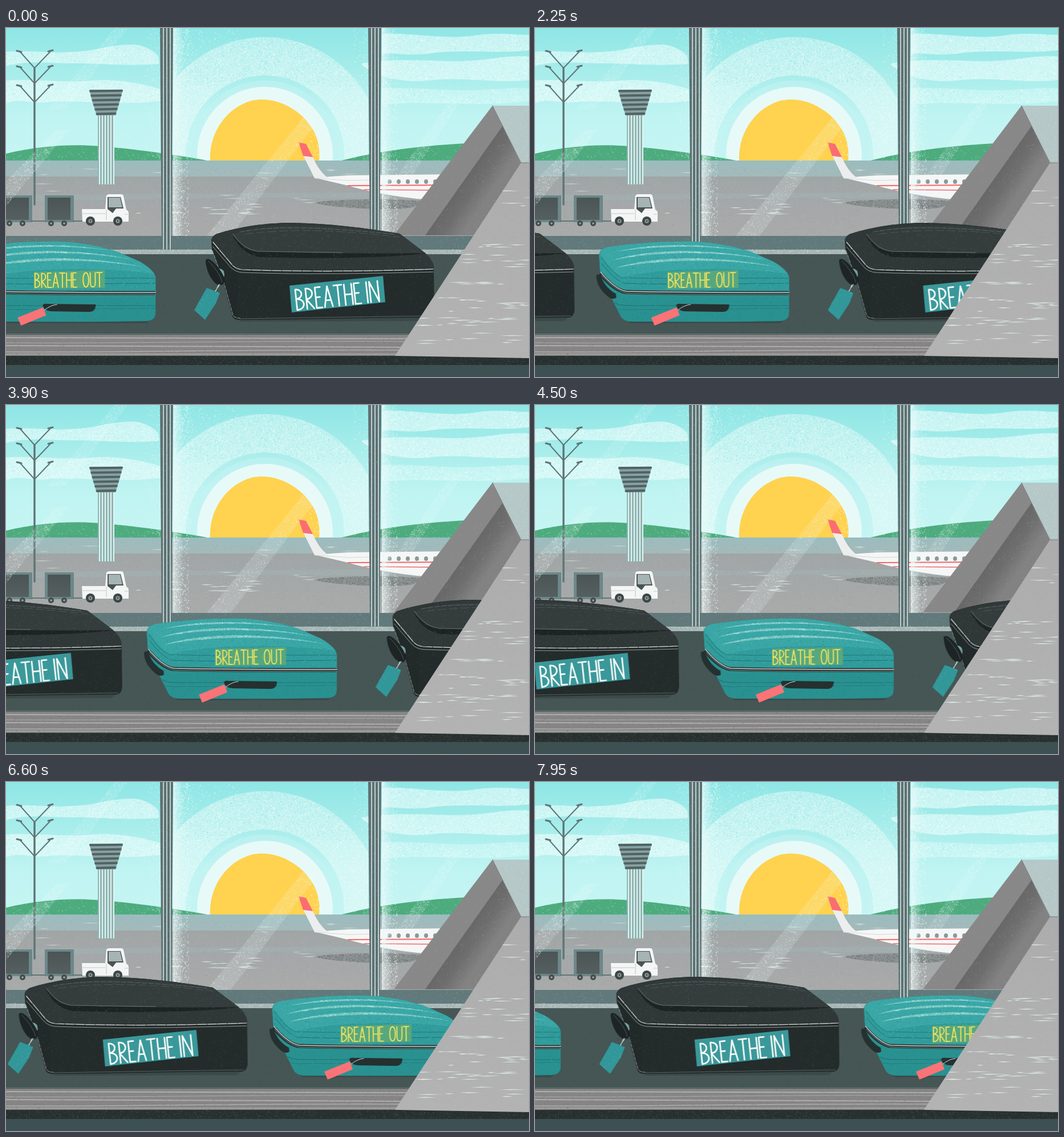
These frames come from a looping animation (917 by 611 pixels, 8000 ms). An HTML page with a canvas:

```html
<!DOCTYPE html>
<html lang="en">
<head>
<meta charset="utf-8">
<title>Baggage belt</title>
<style>
html, body { margin: 0; width: 100%; height: 100%; overflow: hidden; background: #455655; }
#stage { position: relative; width: 917px; height: 611px; overflow: hidden; }
canvas { position: absolute; top: 0; left: 0; }
#belt { left: -900px; will-change: transform; }
</style>
</head>
<body>
<div id="stage">
  <canvas id="scene" width="917" height="611"></canvas>
  <canvas id="belt" width="1817" height="611" role="img" aria-label="BREATHE IN, BREATHE OUT"></canvas>
  <canvas id="ramp" width="917" height="611"></canvas>
</div>
<script>
const STEP_MS = 150, STEPS = 53, LOOP = 8000, STEP_PX = 12.22, GAP = 865;

let seed = 7;
function rnd() {
  seed = (seed + 0x6D2B79F5) | 0;
  let t = Math.imul(seed ^ (seed >>> 15), 1 | seed);
  t = (t + Math.imul(t ^ (t >>> 7), 61 | t)) ^ t;
  return ((t ^ (t >>> 14)) >>> 0) / 4294967296;
}

const layer = id => document.getElementById(id).getContext('2d');
const disc = (x, y, r) => `M${x - r} ${y}a${r} ${r} 0 1 1 ${2 * r} 0a${r} ${r} 0 1 1 ${-2 * r} 0z`;
const box = (x, y, w, h) => `M${x} ${y}h${w}v${h}h${-w}z`;

function fill(c, color, d) {
  c.fillStyle = color;
  c.fill(new Path2D(d), 'evenodd');
}
function line(c, color, width, d, dash = []) {
  c.strokeStyle = color;
  c.lineWidth = width;
  c.lineCap = c.lineJoin = 'round';
  c.setLineDash(dash);
  c.stroke(new Path2D(d));
  c.setLineDash([]);
}
function fade(c, x0, y0, x1, y1, ...colors) {
  const g = c.createLinearGradient(x0, y0, x1, y1);
  colors.forEach((k, i) => g.addColorStop(i / (colors.length - 1), k));
  return g;
}
// Chalky specks inside a path; px and py push them towards the left or top.
function grain(c, color, n, d, [x, y, w, h], px = 1, py = 1) {
  c.save();
  c.clip(new Path2D(d), 'evenodd');
  c.fillStyle = color;
  for (let i = 0; i < n; i++) {
    const s = 0.7 + rnd() * 0.9;
    c.fillRect(x + w * rnd() ** px, y + h * rnd() ** py, s, s);
  }
  c.restore();
}
function spray(c, color, n, x, y, w, h, px, py) {
  grain(c, color, n, box(Math.min(x, x + w), y, Math.abs(w), h), [x, y, w, h], px, py);
}
// Thin tapered brush marks.
function scratches(c, color, n, [x, y, w, h], len, d) {
  c.save();
  if (d) c.clip(new Path2D(d));
  for (let i = 0; i < n; i++) {
    const l = len * (0.3 + rnd()), a = x + rnd() * w, b = y + rnd() * h;
    fill(c, color, `M${a} ${b}l${l * .5} ${-.7}l${l * .5} ${.8}l${-l * .6} ${.8}z`);
  }
  c.restore();
}

const GLYPHS = {
  B: [1.1, 'M0 0V1M0 0C1 0 1 .45 0 .47C1.25 .47 1.25 1 0 1'],
  R: [1, 'M0 1V0C1.2 0 1.2 .5 0 .53L1 1'],
  E: [.82, 'M.9 0H0V1H1M0 .48H.75'],
  A: [1.15, 'M0 1L.5 0L1 1M.18 .68H.82'],
  T: [1.15, 'M0 0H1M.5 0V1'],
  H: [1.05, 'M0 0V1M1 0V1M0 .5H1'],
  I: [.15, 'M.5 0V1'],
  N: [1.2, 'M0 1V0L1 1V0'],
  O: [1.25, 'M.5 0C1.15 0 1.15 1 .5 1C-.15 1-.15 0 .5 0'],
  U: [1.1, 'M0 0V.7C0 1.1 1 1.1 1 .7V0']
};
function letter(c, text, x, y, [w, h, gap, space], tilt, color, weight) {
  c.save();
  c.translate(x, y);
  c.rotate(tilt);
  c.strokeStyle = color;
  c.lineWidth = weight;
  c.lineCap = c.lineJoin = 'round';
  let at = 0;
  for (const ch of text) {
    if (ch === ' ') { at += space; continue; }
    const [k, d] = GLYPHS[ch], p = new Path2D();
    p.addPath(new Path2D(d), new DOMMatrix([w * k, 0, 0, h, at, 0]));
    c.stroke(p);
    at += w * k + gap;
  }
  c.restore();
}

function sky(c) {
  fill(c, fade(c, 0, 0, 0, 232, '#8ee6e5', '#a7edeb', '#bff4f2', '#c6f5f3'), box(0, 0, 917, 232));

  const cx = 454, cy = 222;
  c.save();
  c.beginPath();
  c.rect(294, 0, 341, 232);
  c.clip();
  const ring = disc(cx, cy, 206) + disc(cx, cy, 139);
  fill(c, 'rgba(232,251,250,.5)', ring);
  grain(c, 'rgba(242,254,253,.75)', 7000, ring, [250, 10, 410, 225]);
  grain(c, 'rgba(150,232,230,.75)', 2300, ring, [310, 12, 320, 90], 1, 1.4);
  spray(c, 'rgba(235,253,252,.65)', 900, 294, 0, 120, 232, 1.4, 1);
  fill(c, 'rgba(196,244,243,.6)', disc(cx, cy, 130));
  fill(c, '#e7faf8', disc(cx, cy, 119));
  const sun = 'M358 233C355 184 387 139 431 127C479 117 530 150 545 193C550 208 550 222 549 233z';
  fill(c, '#ffd24f', sun);
  grain(c, '#fff0b8', 200, sun, [553, 130, -24, 103], 1.7);
  c.restore();

  const clouds = [
    'M0 42C40 38 80 46 130 41C160 39 175 31 215 29C245 28 262 42 268 52V63C200 68 160 60 110 62C70 62 40 56 0 67z',
    'M0 92C50 88 100 97 150 92C200 88 245 99 270 107V128C190 137 120 124 70 130C40 132 20 122 0 132z',
    'M659 10C720 8 770 22 830 12C870 7 900 13 917 12V39C860 46 800 36 740 45C700 49 670 42 659 45z',
    'M624 62C690 50 760 61 820 57C860 53 890 47 917 50V91C860 98 800 84 740 92C700 96 650 88 624 64z',
    'M659 106C720 102 780 113 840 108C870 106 900 104 917 106V128C830 140 740 126 659 134z'
  ];
  clouds.forEach((d, i) => {
    const area = [i < 2 ? 0 : 620, 5, i < 2 ? 272 : 300, 135];
    fill(c, i === 4 ? 'rgba(235,253,252,.33)' : 'rgba(235,253,252,.6)', d);
    grain(c, 'rgba(246,255,254,.8)', 2600, d, area);
    grain(c, 'rgba(150,232,230,.6)', 900, d, area);
  });

  const hills = 'M0 220C60 206 115 203 165 207C240 213 310 224 358 233H0zM584 233C650 216 725 205 830 201V233z';
  fill(c, '#4dab7e', hills);
  grain(c, 'rgba(150,215,180,.6)', 700, hills, [0, 200, 830, 33], 1, .7);
}

function ground(c) {
  fill(c, fade(c, 0, 232, 0, 262, '#9bbcbe', '#a5b9ba'), box(0, 232, 917, 30));
  fill(c, fade(c, 0, 260, 0, 364, '#a0a5a5', '#a5a8a8', '#a9aaaa'), box(0, 260, 917, 104));
  fill(c, 'rgba(160,184,185,.35)', 'M0 292L917 286V300L400 297L0 304z');
  spray(c, 'rgba(182,194,194,.5)', 2000, 0, 232, 917, 132, 1, 1);
  spray(c, 'rgba(142,150,150,.4)', 1200, 0, 240, 917, 124, 1, 1);
  scratches(c, 'rgba(215,232,231,.6)', 16, [0, 240, 620, 70], 36);
  scratches(c, 'rgba(225,240,238,.75)', 16, [215, 308, 220, 18], 30);

  const shade = 'M538 306C580 298 690 299 735 303L712 314C680 320 580 316 538 306z';
  fill(c, 'rgba(112,120,120,.4)', shade);
  grain(c, '#707878', 1100, shade, [538, 298, 198, 22]);
}

function airfield(c) {
  const pole = '#5f7475';
  line(c, pole, 3.4, 'M50 70V309');
  for (const y of [40, 67, 100]) {
    line(c, pole, 1.9, `M25 ${y + 2}L50 ${y + 30}L77 ${y + 2}`);
    line(c, pole, 3, `M19 ${y}l8 2M82 ${y - 1}l-8 2`);
  }

  fill(c, '#8fb5b3', box(161, 150, 29, 124));
  for (let x = 164; x < 190; x += 5) line(c, '#e2f4f2', 2, `M${x} 153V273`);
  fill(c, '#86a2a2', 'M146 108H205L199 130L192 153H159L151 128z');
  for (let i = 0; i < 6; i++) {
    const y = 110.5 + i * 8, k = i * 2.3;
    line(c, '#526263', 4, `M${148 + k} ${y}L${203 - k} ${y - .8}`);
  }

  for (const x of [-5, 68]) {
    fill(c, '#6d8789', box(x, 293, 51, 47));
    fill(c, fade(c, 0, 297, 0, 338, '#4b5555', '#566061'), box(x + 5, 297, 40, 39));
    for (const w of [x + 11, x + 34]) {
      fill(c, '#434d4d', disc(w, 342, 5));
      fill(c, '#9aa8a8', disc(w, 342, 1.8));
    }
  }
  line(c, '#607475', 2, 'M45 338H68M118 338H134');

  fill(c, '#f4f6f5', 'M133 317H174L176 294Q177 291 181 291H202Q205 291 206 294L211 318Q215 320 215 324V339H134z');
  fill(c, '#4a5354', 'M178 296H201L206 316H193L187 324L178 317z');
  fill(c, '#a7b4b4', 'M180 297H200L204 314H180z');
  line(c, '#c5cdcc', 1.2, 'M134 325H174M176 318V336M208 326h6');
  for (const x of [148, 196]) {
    fill(c, '#3d4545', disc(x, 338, 8));
    fill(c, '#8d9999', disc(x, 338, 3.6));
    fill(c, '#3d4545', disc(x, 338, 1.4));
  }

  const hull = 'M540 262L600 258L790 256V300H735C700 298 640 288 600 276z';
  fill(c, '#f5f7f6', hull);
  fill(c, '#eceeed', 'M521 223L538 226C544 240 552 253 565 263L541 263z');
  fill(c, '#fb6d72', 'M513 200L526 203L538 226L521 224z');
  line(c, '#d2dad9', 1, 'M542 263L600 267L640 266');
  line(c, '#f4666a', 2, 'M600 276L770 275');
  line(c, '#f4666a', 1.3, 'M628 283L760 284');
  for (let i = 0; i < 6; i++) {
    fill(c, '#879b9a', `M${669 + i * 16} 269a3.5 4 0 1 1 7 0a3.5 4 0 1 1 -7 0z`);
  }
}

function glass(c) {
  const beams = [
    ['M520 158L546 164L394 364H352z', [348, 155, 202, 210], .15],
    ['M190 0H214L106 142L72 142z', [70, 0, 146, 142], .07],
    ['M88 178L112 178L0 312V268z', [0, 176, 116, 138], .1],
    ['M784 118L804 118L712 258H686z', [684, 116, 124, 142], .08]
  ];
  for (const [d, area, a] of beams) {
    fill(c, `rgba(240,252,251,${a})`, d);
    grain(c, 'rgba(240,252,251,.45)', 1700, d, area);
  }
  for (const x of [293, 659]) {
    fill(c, fade(c, x, 0, x + 18, 0, 'rgba(235,250,249,.6)', 'rgba(235,250,249,0)'), box(x, 0, 18, 364));
    spray(c, 'rgba(238,252,251,.7)', 1500, x, 0, 28, 364, 2, 1);
    spray(c, 'rgba(238,252,251,.5)', 450, x - 23, 0, -28, 232, 2, 1);
  }
}

function hall(c) {
  fill(c, '#61797a', box(0, 364, 917, 24));
  spray(c, 'rgba(135,160,160,.4)', 900, 0, 364, 917, 24, 1, 1);
  for (const x of [270, 635]) {
    fill(c, '#5c7071', `M${x} 0H${x + 23}L${x + 20} 387H${x + 3}z`);
    for (const k of [6, 12, 18]) line(c, '#d5e8e6', 1.6, `M${x + k} 0V387`);
    spray(c, 'rgba(145,170,170,.4)', 250, x, 0, 22, 387, 1, 1);
  }
  fill(c, '#a7b6b5', box(0, 388, 917, 8));
  spray(c, 'rgba(215,228,227,.6)', 700, 0, 387, 917, 9, 1, 1);

  const back = 'M853 136L905 238L824 363H680z';
  fill(c, '#898888', back);
  fill(c, fade(c, 800, 262, 846, 294, '#676666', '#6f6e6e', '#838282'), 'M871 171L905 238L824 363H735z');
  grain(c, 'rgba(160,160,160,.4)', 1100, back, [680, 136, 225, 228]);

  fill(c, '#455655', box(0, 396, 917, 140));
  spray(c, 'rgba(57,73,73,.45)', 1400, 0, 396, 917, 140, 1, 1);
  line(c, '#68787a', 1.2, 'M0 535.5H720');
  fill(c, '#878585', box(0, 537, 760, 38));
  for (const [y, e, w] of [[542, 544, 1.8], [551, 549, 1], [556, 559, 1.8], [567, 564, 1.4], [571, 571, 1.4]]) {
    line(c, '#aeafaf', w, `M0 ${y}C180 ${y + 2} 420 ${e - 2} 720 ${e}`);
  }
  spray(c, 'rgba(118,119,119,.5)', 800, 0, 537, 720, 37, 1, 1);
  fill(c, '#28302f', box(0, 574, 917, 17));
  spray(c, 'rgba(70,86,85,.6)', 1300, 0, 574, 917, 17, 1, 1);
  fill(c, '#3d5052', box(0, 590, 917, 21));
  spray(c, 'rgba(60,88,90,.8)', 900, 0, 591, 917, 20, 1, 1);
}

function blackCase(c) {
  const body = 'M360 372Q360 366 368 361C410 347 460 341 500 341C565 342 630 350 690 360L735 394Q750 408 750 420L751 494Q750 505 742 507C630 507 520 511 408 511Q400 511 397 505L381 446L361 388z';
  const lid = 'M360 372Q360 366 368 361C410 347 460 341 500 341C565 342 630 350 690 360L735 394Q750 408 750 423C630 427 520 427 412 423Q402 421 396 413L363 376z';
  fill(c, 'rgba(45,60,60,.45)', 'M398 505L745 503L732 513L412 514z');
  fill(c, '#242b2b', body);
  fill(c, '#222929', 'M361 376L396 417Q404 424 406 428L404 508L397 503L381 446z');
  fill(c, '#2f3737', lid);
  fill(c, '#343c3c', 'M396 361C450 346 500 344 560 347C620 350 660 355 690 360L735 394C640 396 520 392 440 391C418 389 410 376 396 361z');
  fill(c, '#1d2323', 'M396 361C410 378 420 390 440 391C540 394 640 396 737 394C680 402 560 405 445 401C420 397 406 381 396 361z');
  line(c, '#7c8685', .8, 'M398 361C412 380 424 388 442 391C500 392 560 393 590 393');
  line(c, '#626c6b', .9, 'M410 357C470 345 560 349 680 361', [9, 3]);
  line(c, '#555f5e', .8, 'M420 361C500 350 590 354 690 366', [14, 6]);
  grain(c, 'rgba(88,100,99,.5)', 900, lid, [360, 341, 392, 85]);
  grain(c, 'rgba(65,77,76,.5)', 800, body, [360, 425, 392, 87]);
  line(c, '#dde3e1', 1.2, 'M363 375L395 413Q402 422 414 423C520 427 640 426 749 422', [16, 1.8]);
  line(c, '#9fa9a8', .9, 'M363 383L394 419Q402 427 414 428C520 432 640 430 749 427');
  line(c, '#a4aead', .9, 'M362 390L382 446L398 503Q401 508 410 508', [6, 2]);
  line(c, '#667271', .8, 'M410 509L600 506L744 504');

  fill(c, '#78a3a3', 'M374 421Q383 422 383 433Q380 443 372 440z');
  fill(c, '#1d2424', 'M350 406Q354 402 360 407C372 416 383 433 384 443Q381 452 372 450C360 444 350 423 350 406z');
  line(c, '#596463', .9, 'M355 408C365 418 376 432 379 445');
  line(c, '#cbd9d8', 1.1, 'M375 449L363 466M373 449L367 462');
  const tag = 'M352 455L375 464L368 482L349 511L330 494z';
  fill(c, '#319799', tag);
  grain(c, 'rgba(90,185,183,.5)', 90, tag, [330, 453, 46, 58]);

  const label = 'M497 451L661 434L665 480L501 498z';
  fill(c, '#3a989a', label);
  grain(c, 'rgba(95,180,178,.45)', 200, label, [496, 433, 170, 65]);
  letter(c, 'BREATHE IN', 507, 458, [12.2, 36, 4.4, 6.5], -.105, '#fbfdfb', 2.7);
}

function tealCase(c) {
  const body = 'M27 402Q25 388 40 384C90 376 150 373 195 374C240 377 270 384 296 393L332 409Q360 425 360 438V499Q360 511 346 513C260 515 170 514 82 514Q68 513 64 504L49 474L29 433z';
  const lid = 'M27 402Q25 388 40 384C90 376 150 373 195 374C240 377 270 384 296 393L332 409Q360 425 360 438V462H75Q60 461 50 449L29 429z';
  fill(c, 'rgba(45,60,60,.4)', 'M66 506L358 506L344 517L82 517z');
  fill(c, '#2a9191', body);
  fill(c, '#319c9c', lid);
  fill(c, '#3aa7a6', 'M29 395Q30 387 40 384C90 376 150 373 195 374C240 377 270 384 296 393L332 409C345 416 353 424 356 430C260 417 130 420 64 437Q38 418 29 395z');
  grain(c, 'rgba(35,132,134,.5)', 1400, body, [27, 374, 334, 140], 1, .7);
  grain(c, 'rgba(95,195,191,.45)', 900, lid, [27, 374, 334, 88], 1, 1.4);

  const ribs = [
    'M60 391C110 378 200 375 282 390C200 378 115 383 60 391z',
    'M50 407C110 386 220 385 318 405C220 388 115 392 50 407z',
    'M56 420C115 400 230 396 338 418C230 401 125 406 56 420z'
  ];
  for (const d of ribs) {
    fill(c, 'rgba(165,222,217,.5)', d);
    grain(c, 'rgba(205,240,236,.8)', 2600, d, [30, 376, 310, 46]);
  }
  line(c, '#237d7f', 1.2, 'M31 401C44 421 56 432 67 437C160 440 260 437 359 438', [60, 3]);
  line(c, '#1f7274', 1, 'M32 413Q53 440 70 447C160 450 260 447 359 447', [44, 4]);
  line(c, '#1f7274', 1.1, 'M54 481Q62 486 80 486H359', [70, 3]);
  line(c, '#237d7f', 1, 'M58 491Q66 494 85 493L359 491', [38, 4]);

  line(c, '#253030', 7, 'M31 432Q53 458 72 462C160 465 260 464 357 464');
  line(c, '#c8d5d2', 1.5, 'M30 428Q54 457 74 461C160 463 260 463 360 463');
  line(c, '#8ca09e', .8, 'M31 433Q54 460 74 464C160 467 260 466 360 466');
  fill(c, '#253030', 'M22 434Q23 429 29 433C34 447 45 460 56 465L57 472Q50 477 42 470C29 459 22 447 22 434z');

  fill(c, '#253030', 'M162 486Q163 482 170 483L255 484Q255 497 243 497L177 496Q164 495 162 486z');
  line(c, '#d2e2df', 1, 'M165 494Q176 485 187 484');
  fill(c, '#fb7377', 'M118 507L163 489L168 503L124 521z');

  const label = 'M146 427L271 424V455L146 457z';
  fill(c, '#58a77c', label);
  grain(c, 'rgba(125,190,140,.45)', 150, label, [146, 424, 125, 33]);
  letter(c, 'BREATHE OUT', 148.5, 429.5, [8, 25, 2.7, 8.5], -.012, '#f1e461', 1.9);
}

function cover(c) {
  const top = 'M853 136H917V237H903z';
  fill(c, '#b5c7c7', top);
  grain(c, 'rgba(205,218,217,.5)', 500, top, [853, 136, 64, 101]);
  const front = 'M903 236H917V578L682 574z';
  fill(c, fade(c, 0, 236, 0, 577, '#acacac', '#b3b3b3'), front);
  grain(c, 'rgba(190,192,192,.5)', 1600, front, [682, 236, 235, 342]);
  grain(c, 'rgba(160,160,160,.4)', 700, front, [682, 236, 235, 342]);
  line(c, '#757777', 1, 'M853 136L903 236H917');
  const bands = [[850, 268, 70, 50, 4], [815, 374, 85, 12, 6], [785, 394, 125, 26, 9], [775, 445, 90, 4, 6],
    [755, 472, 145, 24, 15], [715, 506, 165, 16, 15], [708, 533, 195, 20, 8]];
  for (const [x, y, w, h, n] of bands) scratches(c, 'rgba(228,243,240,.8)', n, [x, y, w, h], 38, front);
}

const scene = layer('scene');
[sky, ground, airfield, glass, hall].forEach(draw => draw(scene));

const belt = layer('belt');
for (const x of [0, -GAP]) {
  for (const [draw, dx] of [[tealCase, -97.7], [blackCase, 0]]) {
    belt.save();
    belt.translate(900 + x + dx, 0);
    draw(belt);
    belt.restore();
  }
}
cover(layer('ramp'));

const end = `translateX(${STEP_PX * STEPS}px)`;
belt.canvas.animate([
  { offset: 0, transform: 'translateX(0px)', easing: `steps(${STEPS}, end)` },
  { offset: STEPS * STEP_MS / LOOP, transform: end },
  { offset: 1, transform: end }
], { duration: LOOP, iterations: Infinity });
</script>
</body>
</html>
```
